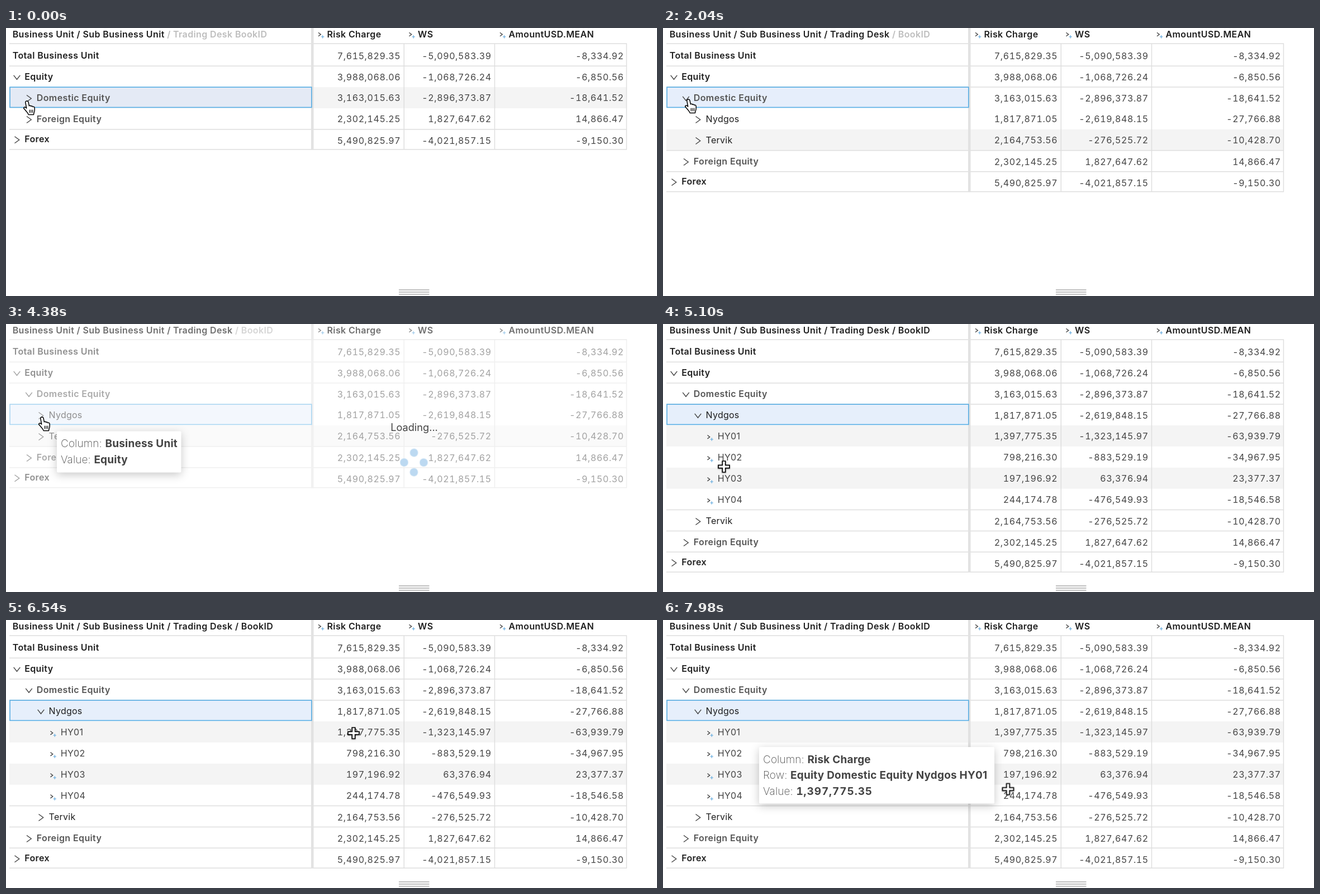
These frames come from a looping animation (1165x481 px, 8000 ms). An HTML page:

```html
<!DOCTYPE html>
<html lang="en">
<head>
<meta charset="utf-8">
<title>Pivot table drill-down</title>
<style>
html, body { margin: 0; width: 100%; height: 100%; overflow: hidden; background: #fff; }
svg { display: block; width: 1165px; height: 481px; }
text { font: 400 16px Inter, "Open Sans", sans-serif; letter-spacing: .25px; fill: #1f1f1f; white-space: pre; }
.bold { font-weight: 600; letter-spacing: .38px; }
.soft { fill: #555; }
.leaf { fill: #444; }
.faded { fill: #bdbdbd; }
.num { fill: #444; letter-spacing: .6px; font-variant-numeric: tabular-nums; text-anchor: end; }
.rule { stroke: #dedede; stroke-width: 1.5; }
.icon { fill: none; stroke: #444; stroke-width: 1.4; }
.plus { fill: none; stroke: #5aa5dc; stroke-width: 1.1; }
.pick { stroke: #55ace3; stroke-width: 1.6; }
.tip rect { fill: #fff; filter: drop-shadow(0 4px 8px rgba(0,0,0,.22)); }
.tip text { font-size: 19px; font-weight: 200; letter-spacing: .1px; fill: #4a4a4a; }
.tip tspan { font-weight: 700; letter-spacing: .2px; fill: #444; }
.tip .figure { letter-spacing: .9px; font-variant-numeric: tabular-nums; }
.message { font-size: 18.2px; fill: #444; text-anchor: middle; letter-spacing: 0; }
.dots { fill: #bcd9f1; transform-origin: 730px 248.5px; }

.view, .tip, #load, #pickA, #pickB, #hand, #cross, .dots { animation: 8s linear infinite; }
#view0 { animation-name: view0; }
#view1 { animation-name: view1; }
#view2 { animation-name: view2; }
#pickA { animation-name: pickA; }
#pickB { animation-name: pickB; }
#load { animation-name: load; }
#tip0 { animation-name: tip0; }
#tip1 { animation-name: tip1; }
#tip2 { animation-name: tip2; }
.dots { animation-name: spin; }
#hand { animation-name: hand; animation-timing-function: ease-in-out; }
#cross { animation-name: cross; animation-timing-function: ease-in-out; }
.view, #pickA, #pickB { animation-timing-function: step-end; }

@keyframes view0 { 0% { opacity: 1 } 19.5%, 100% { opacity: 0 } }
@keyframes view1 { 0% { opacity: 0 } 19.5% { opacity: 1 } 57.75%, 100% { opacity: 0 } }
@keyframes view2 { 0% { opacity: 0 } 57.75%, 100% { opacity: 1 } }
@keyframes pickA { 0% { opacity: 1 } 48.75%, 100% { opacity: 0 } }
@keyframes pickB { 0% { opacity: 0 } 48.75%, 100% { opacity: 1 } }
@keyframes load {
  0%, 14.25% { opacity: 0 } 15.75%, 19.5% { opacity: 1 } 21%, 48.75% { opacity: 0 }
  51%, 57.75% { opacity: 1 } 59.25%, 100% { opacity: 0 }
}
@keyframes spin {
  0%, 15% { transform: rotate(0deg) } 21%, 54.75% { transform: rotate(90deg) }
  59.25%, 100% { transform: rotate(180deg) }
}
@keyframes tip0 { 0%, 8.25% { opacity: 0 } 10.5%, 23.25% { opacity: 1 } 25.5%, 100% { opacity: 0 } }
@keyframes tip1 { 0%, 43.5% { opacity: 0 } 45.75%, 59.25% { opacity: 1 } 61.5%, 100% { opacity: 0 } }
@keyframes tip2 { 0%, 86.25% { opacity: 0 } 89.25%, 100% { opacity: 1 } }
@keyframes hand {
  0%, .75% { transform: translate(31px, 130px); opacity: 1 }
  6%, 32.25% { transform: translate(39px, 127px) }
  39%, 59.25% { transform: translate(58px, 166px); opacity: 1 }
  60.74% { transform: translate(72px, 190px); opacity: 1 }
  60.75%, 100% { transform: translate(72px, 190px); opacity: 0 }
}
@keyframes cross {
  0%, 60.74% { transform: translate(82px, 203px); opacity: 0 }
  60.75% { transform: translate(82px, 203px); opacity: 1 }
  63.75% { transform: translate(109px, 256px) }
  69% { transform: translate(150px, 264px) }
  80.25%, 92.25% { transform: translate(622px, 203px) }
  99.5%, 100% { transform: translate(617.5px, 303.5px); opacity: 1 }
}
</style>
</head>
<body>
<svg id="stage" viewBox="0 0 1165 481"></svg>
<script>
// name: [level, risk charge, ws, mean]
const DATA = {
  "Total Business Unit": [0, "7,615,829.35", "-5,090,583.39", "-8,334.92"],
  "Equity": [1, "3,988,068.06", "-1,068,726.24", "-6,850.56"],
  "Domestic Equity": [2, "3,163,015.63", "-2,896,373.87", "-18,641.52"],
  "Nydgos": [3, "1,817,871.05", "-2,619,848.15", "-27,766.88"],
  "HY01": [4, "1,397,775.35", "-1,323,145.97", "-63,939.79"],
  "HY02": [4, "798,216.30", "-883,529.19", "-34,967.95"],
  "HY03": [4, "197,196.92", "63,376.94", "23,377.37"],
  "HY04": [4, "244,174.78", "-476,549.93", "-18,546.58"],
  "Tervik": [3, "2,164,753.56", "-276,525.72", "-10,428.70"],
  "Foreign Equity": [2, "2,302,145.25", "1,827,647.62", "14,866.47"],
  "Forex": [1, "5,490,825.97", "-4,021,857.15", "-9,150.30"]
};
const STYLE = ["bold", "bold", "bold soft", "", "leaf"];
const LABEL_X = [11.7, 33.2, 54.8, 76.6, 97.8];
const NUM_X = [706.3, 868.8, 1105.8];
const PITCH = 37.9;
const rowTop = i => 30.3 + PITCH * i;

const text = (x, y, str, cls = "") => `<text x="${x}" y="${y}" class="${cls}">${str}</text>`;
const box = (x, y, w, h, attrs) => `<rect x="${x}" y="${y}" width="${w}" height="${h}" ${attrs}/>`;
const rule = (x1, y1, x2, y2) => `<path class="rule" d="M${x1} ${y1}L${x2} ${y2}"/>`;
const across = y => rule(6, y, 1111, y);
const chevron = (x, y, open) =>
  `<path class="icon" d="${open ? `M${x - 5.8} ${y - 3.6}l5.8 7.4 5.8 -7.4` : `M${x - 4} ${y - 6}l8.2 6-8.2 6`}"/>`;
const addIcon = (x, y) =>
  `<path class="icon" d="M${x} ${y - 3.5}l4.2 3.2-4.2 3.2"/><path class="plus" d="M${x + 5} ${y + 4}h5.4m-2.7-2.7v5.4"/>`;
const pick = (i, fill, id = "") =>
  box(7, rowTop(i) + .1, 539.8, 36.3, `class="pick" fill="${fill}" ${id && `id="${id}"`}`);

function row(name, i, rows, open, lined) {
  const [level, ...nums] = DATA[name];
  const last = i === rows.length - 1;
  const y = 49 + 38 * i + (last ? -1.8 : 0);
  const numY = 49 + 38 * i + (lined ? 1.2 : .4) + 5.8;
  let out = text(LABEL_X[level], y + 5.8, name, STYLE[level]);
  if (level === 4) out += addIcon(79.5, y + 2);
  else if (level) out += chevron(19.5 + 21.5 * (level - 1), y + 1.5, open);
  return out + nums.map((n, k) => text(NUM_X[k], numY, n, "num")).join("");
}

function view(id, names, opened, striped, path, rest, picks) {
  const bottom = rowTop(names.length - 1) + 36;
  // a row has a line above it if it is open, or if it follows a deeper group
  const lined = names.map((n, i) => i === 0 || opened.includes(n) ||
    DATA[n][0] < DATA[names[i - 1]][0]);
  let out = striped.map(n => box(6, rowTop(names.indexOf(n)), 1105, PITCH, 'fill="#f4f4f4"')).join("");
  out += names.map((n, i) => i && lined[i] ? across(rowTop(i)) : "").join("");
  out += across(28) + across(bottom);
  out += [712.3, 874.5, 1110.5].map(x => rule(x, 28, x, bottom)).join("");
  out += box(546, 0, 4.5, bottom + .7, 'fill="#e2e2e2"') + picks;
  out += text(11.7, 17.4, `${path}<tspan class="faded">${rest}</tspan>`, "bold");
  out += names.map((n, i) => row(n, i, names, opened.includes(n), lined[i])).join("");
  return `<g class="view" id="${id}">${out}</g>`;
}

function tip(id, x, y, w, h, lines) {
  const body = lines.map(([key, value, cls = ""], i) =>
    text(x + 7, y + 28.8 + 28.6 * i, `${key}: <tspan class="${cls}">${value}</tspan>`)).join("");
  return `<g class="tip" id="${id}">${box(x, y, w, h, 'rx="2"')}${body}</g>`;
}

const all = Object.keys(DATA);
const upTo = max => all.filter(n => DATA[n][0] <= max);
const unit = "Business Unit / Sub Business Unit ";
const unitTip = [["Column", "Business Unit"], ["Value", "Equity"]];

const header = [[559, "Risk Charge"], [721.5, "WS"], [884, "AmountUSD.MEAN"]]
  .map(([x, s]) => addIcon(x, 11.8) + text(x + 15.5, 17.4, s, "bold")).join("");
const grip = [470, 474, 478].map(y => `<path d="M703 ${y}h54.5" stroke="#aaa" stroke-width="1.3"/>`).join("");
const dots = [[0, -17.5], [17.5, 0], [0, 17.5], [-17.5, 0]]
  .map(([x, y]) => `<circle cx="${730 + x}" cy="${248.5 + y}" r="7.3"/>`).join("");

document.getElementById("stage").innerHTML =
  view("view0", upTo(2), ["Equity"], ["Domestic Equity"], unit, "/ Trading Desk BookID", pick(2, "#e4eaf5")) +
  view("view1", upTo(3), ["Equity", "Domestic Equity"], ["Tervik"], unit + "/ Trading Desk ", "/ BookID",
    pick(2, "#e6eefb", "pickA") + pick(3, "#e6eefb", "pickB")) +
  view("view2", all, ["Equity", "Domestic Equity", "Nydgos"], ["HY01", "HY03"],
    unit + "/ Trading Desk / BookID", "", pick(3, "#e6effb")) +
  header + grip +
  `<g id="load">${box(0, 0, 1165, 29, 'fill="#fff" opacity=".36"')}${box(0, 29, 1165, 436, 'fill="#fff" opacity=".5"')}
    <g class="dots">${dots}</g>${text(730.5, 191.5, "Loading...", "message")}</g>` +
  tip("tip0", 65, 157, 223, 74, unitTip) +
  tip("tip1", 91, 192.5, 222.5, 74, unitTip) +
  tip("tip2", 172, 228, 421, 101.5, [["Column", "Risk Charge"],
    ["Row", "Equity Domestic Equity Nydgos HY01"], ["Value", "1,397,775.35", "figure"]]) +
  `<g id="hand" fill="#fff" stroke="#000" stroke-width="1.5" stroke-linejoin="round" stroke-linecap="round">
    <path d="M6.5 1c1.6 0 2.3 1 2.6 2.4l1.3 6.4c.5-.9 3-.9 3.4 .8 .9-.9 2.9-.5 3.2 .9 1.3-.7 2.9 0 3.1 1.6 .4 3 .3 5.2-.6 8-.4 1.4-1 2.3-1 4.4H9.2c-.3-2-2-3.6-3.4-5.4C4.3 18.4 3 16.5 1.3 14.9c-1.4-1.6 .6-3.6 2.4-2.5l2 1.6L3.9 4.2C3.5 2.4 4.5 1 6.5 1z"/>
    <path d="M11.3 17v4.8M14 17v4.8M16.7 17v4.8" stroke-width="1.2"/></g>
  <g id="cross"><path d="M-2.7 -10h5.4v7.3h7.3v5.4h-7.3v7.3h-5.4v-7.3h-7.3v-5.4h7.3z"
    fill="#fff" stroke="#000" stroke-width="1.7" style="filter:drop-shadow(0 1px 1px rgba(0,0,0,.35))"/></g>`;
</script>
</body>
</html>
```
